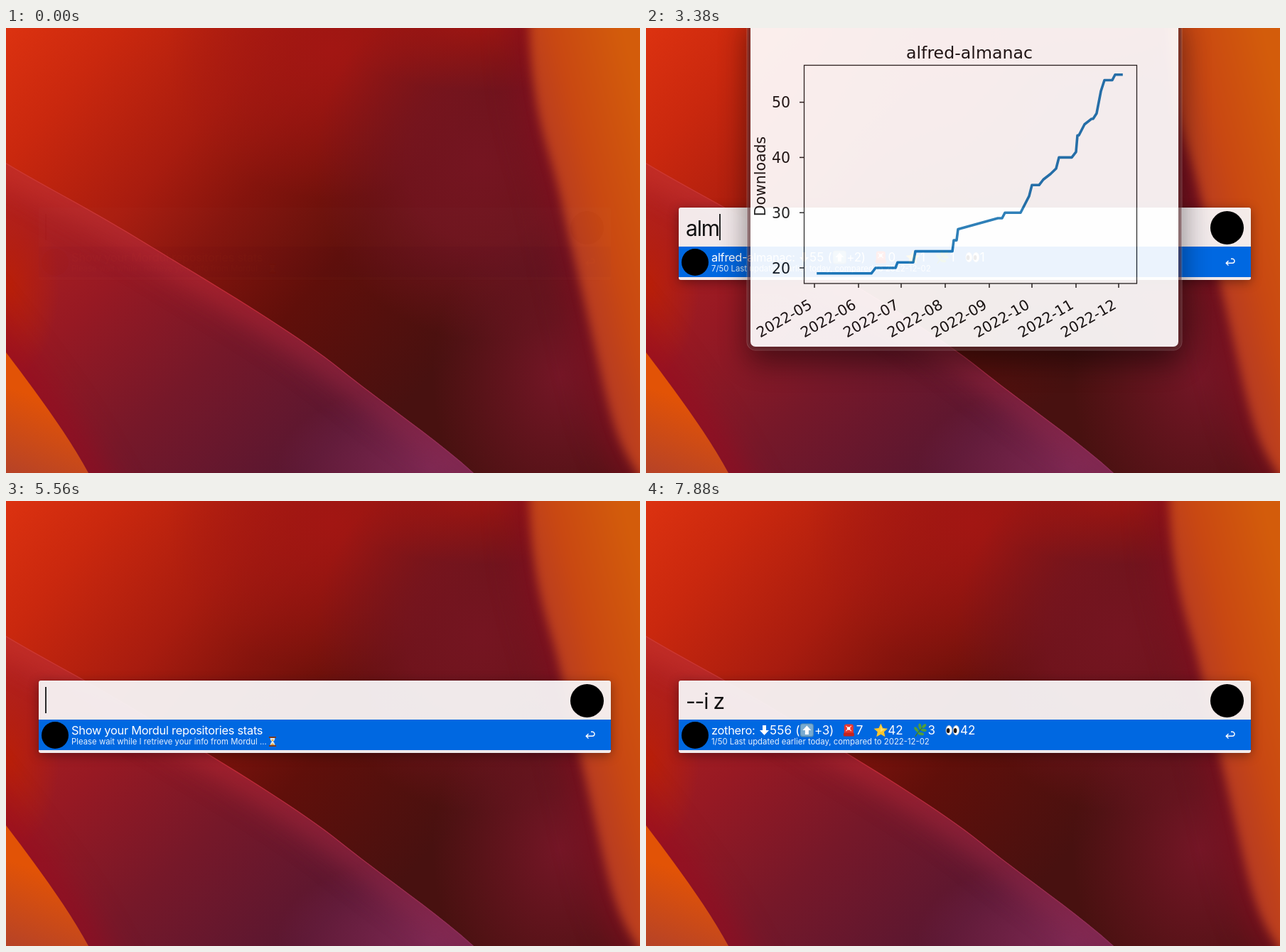
These frames come from a looping animation (892x627 px, 8000 ms). An HTML page:

```html
<!DOCTYPE html>
<html lang="en">
<head>
<meta charset="utf-8">
<title>Repository stats launcher</title>
<style>
html, body { margin: 0; width: 100%; height: 100%; overflow: hidden; background: #7a1414; }
body { position: relative; font-family: Inter, Roboto, sans-serif; color: #111; }
body > svg, .win, .preview { position: absolute; }
.wall { left: 0; top: 0; }
.win { left: 46px; top: 253px; width: 805px; }
.panel, .query, .caret, .logo, .row, .row > * { position: absolute; white-space: pre; }
.panel { left: 0; top: 0; width: 805px; border-radius: 3px; background: rgba(247, 245, 246, .95);
  box-shadow: 0 3px 15px rgba(0, 0, 0, .36), 0 0 1px rgba(0, 0, 0, .4); }
.query { left: 10px; top: 9px; font: 400 30px/40px Inter, Roboto, sans-serif; letter-spacing: -1.2px; }
.caret { top: 9px; width: 2px; height: 37px; background: #2a2a2a; }
.logo { border-radius: 50%; background: #000; }
.big { left: 748px; top: 5px; width: 47px; height: 47px; }
.row { left: 0; width: 805px; height: 43px; }
.row .logo { left: 4px; top: 3px; width: 38px; height: 38px; }
.title, .stats { top: 5px; line-height: 20px; }
.title { left: 46px; font-size: 16.4px; letter-spacing: -.28px; }
.stats { display: flex; align-items: center; height: 20px; font-size: 17px; letter-spacing: .15px; }
.stats svg { flex: none; width: 20.7px; height: 20px; }
.stats svg.drop { width: 14px; height: 16px; }
.num { margin-right: 14px; }
.diff { display: flex; align-items: center; margin: 0 11px 0 -9px; letter-spacing: -.2px; }
.sub { left: 46px; top: 24px; font-size: 11.35px; line-height: 14px; color: #8b8488; }
.sub svg { width: 12px; height: 14px; margin-left: 2px; vertical-align: -3px; }
.key { right: 13px; top: 12px; font-size: 14.5px; line-height: 20px; color: #45106b; }
.first { background: #0068e1; color: #fff; }
.first .sub { color: #e6effc; }
.back { left: 769px; top: 16px; width: 14px; height: 12px; }
.preview { left: 147px; top: -20px; width: 602px; height: 469px; border-radius: 7px; background: #fff;
  box-shadow: 0 0 0 4.5px rgba(70, 10, 15, .5), 0 0 0 5.5px rgba(255, 255, 255, .22), 0 18px 42px 4px rgba(0, 0, 0, .5); }
.preview svg { position: absolute; left: -147px; top: 20px; overflow: visible; }
.preview text { font: 20.5px "DejaVu Sans", sans-serif; fill: #151515; }
.preview .head { font-size: 23.7px; }
</style>
</head>
<body>
<svg class="wall" width="892" height="627" viewBox="0 0 892 627">
  <defs>
    <linearGradient id="base" gradientUnits="userSpaceOnUse" x1="0" y1="0" x2="590" y2="500">
      <stop offset="0" stop-color="#dc3210"/><stop offset=".16" stop-color="#ca280e"/>
      <stop offset=".38" stop-color="#a81c0f"/><stop offset=".53" stop-color="#85140d"/>
      <stop offset=".73" stop-color="#600f0a"/><stop offset="1" stop-color="#481110"/>
    </linearGradient>
    <linearGradient id="sheet" gradientUnits="userSpaceOnUse" x1="0" y1="220" x2="400" y2="640">
      <stop offset="0" stop-color="#b5221e"/><stop offset=".35" stop-color="#971923"/>
      <stop offset=".65" stop-color="#761829"/><stop offset="1" stop-color="#591731"/>
    </linearGradient>
    <linearGradient id="amber" gradientUnits="userSpaceOnUse" x1="755" y1="190" x2="905" y2="150">
      <stop offset="0" stop-color="#b53a24"/><stop offset=".4" stop-color="#c94812"/>
      <stop offset="1" stop-color="#d35c0b"/>
    </linearGradient>
    <linearGradient id="corner" gradientUnits="userSpaceOnUse" x1="45" y1="520" x2="0" y2="645">
      <stop offset="0" stop-color="#e25306"/><stop offset="1" stop-color="#b0402c"/>
    </linearGradient>
    <linearGradient id="rim" gradientUnits="userSpaceOnUse" x1="0" y1="190" x2="658" y2="627">
      <stop offset="0" stop-color="#d03a30"/><stop offset=".5" stop-color="#bd2836"/>
      <stop offset="1" stop-color="#8a2c58"/>
    </linearGradient>
    <radialGradient id="plum"><stop offset="0" stop-color="#751521"/><stop offset=".45" stop-color="#751521" stop-opacity=".8"/><stop offset="1" stop-color="#751521" stop-opacity="0"/></radialGradient>
    <radialGradient id="ruby"><stop offset="0" stop-color="#a21613"/><stop offset="1" stop-color="#a21613" stop-opacity="0"/></radialGradient>
    <radialGradient id="wine"><stop offset="0" stop-color="#741626"/><stop offset="1" stop-color="#741626" stop-opacity="0"/></radialGradient>
    <radialGradient id="violet"><stop offset="0" stop-color="#7c2852"/><stop offset="1" stop-color="#7c2852" stop-opacity="0"/></radialGradient>
    <radialGradient id="ember"><stop offset="0" stop-color="#ba1f08"/><stop offset="1" stop-color="#ba1f08" stop-opacity="0"/></radialGradient>
    <filter id="soft" filterUnits="userSpaceOnUse" x="-80" y="-80" width="1060" height="800" color-interpolation-filters="sRGB"><feGaussianBlur stdDeviation="20"/></filter>
    <filter id="edge" filterUnits="userSpaceOnUse" x="-80" y="-80" width="1060" height="800" color-interpolation-filters="sRGB"><feGaussianBlur stdDeviation="7"/></filter>
    <path id="band" d="M734 -60L736 0C740 130 765 170 780 240S815 390 835 480S865 590 888 627L915 690H960V-60Z"/>
    <path id="fold" d="M-60 156L0 190C60 226 110 250 190 299S400 424 470 480S600 575 658 627L720 682"/>
    <path id="tip" d="M-60 380L0 457C40 510 85 570 116 627L150 690"/>
    <clipPath id="under"><path d="M0 190C60 226 110 250 190 299S400 424 470 480S600 575 658 627H0Z"/></clipPath>
  </defs>
  <rect width="892" height="627" fill="url(#base)"/>
  <ellipse cx="455" cy="30" rx="230" ry="210" fill="url(#ruby)"/>
  <ellipse cx="670" cy="190" rx="235" ry="250" fill="url(#plum)"/>
  <ellipse cx="670" cy="-20" rx="230" ry="110" fill="url(#ruby)"/>
  <ellipse cx="780" cy="490" rx="180" ry="240" fill="url(#wine)"/>
  <use href="#band" fill="none" stroke="#850e20" stroke-width="50" opacity=".6" filter="url(#soft)"/>
  <use href="#band" fill="url(#amber)" filter="url(#edge)"/>
  <g clip-path="url(#under)">
    <rect y="150" width="700" height="480" fill="url(#sheet)"/>
    <ellipse cx="0" cy="365" rx="75" ry="130" fill="url(#ember)"/>
    <ellipse cx="600" cy="620" rx="220" ry="120" fill="url(#violet)"/>
    <use href="#tip" fill="none" stroke="#980a20" stroke-width="50" opacity=".6" filter="url(#soft)"/>
    <use href="#fold" fill="none" stroke="url(#rim)" stroke-width="40" opacity=".65" filter="url(#soft)"/>
    <use href="#fold" fill="none" stroke="url(#rim)" stroke-width="2.4"/>
  </g>
  <path d="M0 457C40 510 85 570 116 627H0Z" fill="url(#corner)"/>
</svg>

<svg width="0" height="0">
  <symbol id="drop" viewBox="0 0 14 16"><path d="M4 1h5v7h4L6.5 15 0 8h4z" fill="currentColor"/></symbol>
  <symbol id="up" viewBox="0 0 20 20"><rect x=".5" y=".5" width="19" height="19" rx="3.5" fill="#5b8fb5"/><rect x="1.5" y="1.5" width="17" height="16.5" rx="3" fill="#79abd0"/><path d="M10 3.5l6 6.5h-3.5v6h-5v-6H4z" fill="#fff"/></symbol>
  <symbol id="down" viewBox="0 0 20 20"><use href="#up" width="20" height="20" transform="rotate(180 10 10)"/></symbol>
  <symbol id="siren" viewBox="0 0 20 20"><rect x="3.5" y="1.5" width="13" height="15" rx="3" fill="#e8372f"/><path d="M6 4l7.5 7M13.500 4L6 11" stroke="#ffc4ba" stroke-width="1.300"/><circle cx="9.800" cy="7.500" r="2.300" fill="#fff"/><rect x="2.500" y="13.500" width="15" height="5" rx="1.500" fill="#c3241f"/></symbol>
  <symbol id="star" viewBox="0 0 20 20"><path d="M10 .6l2.900 6.300 6.900.8-5.200 4.600 1.500 6.900-6.100-3.500-6.100 3.500 1.500-6.900L.2 7.700l6.900-.8z" fill="#fbc62d"/><path d="M10 3l1.800 5 4.500.5-7 4z" fill="#ffe06a"/></symbol>
  <symbol id="herb" viewBox="0 0 20 20"><path d="M2.500 19Q7 11 15 4" fill="none" stroke="#3d7a2c" stroke-width="1.400"/><g fill="#4f9d3c"><ellipse cx="15" cy="4" rx="3.600" ry="2" transform="rotate(-45 15 4)"/><ellipse cx="9" cy="4.500" rx="2" ry="4" transform="rotate(-8 9 4.500)"/><ellipse cx="4" cy="9" rx="2" ry="4.300" transform="rotate(-38 4 9)"/><ellipse cx="14.500" cy="10" rx="4" ry="1.900" transform="rotate(8 14.500 10)"/><ellipse cx="10.500" cy="15" rx="4.400" ry="2" transform="rotate(14 10.500 15)"/></g></symbol>
  <symbol id="eyes" viewBox="0 0 20 20"><g fill="#fff" stroke="#b9b4b4" stroke-width=".7"><ellipse cx="5" cy="10" rx="4.300" ry="6.800"/><ellipse cx="15" cy="10" rx="4.300" ry="6.800"/></g><g fill="#1c1512"><ellipse cx="3.800" cy="10.500" rx="2.300" ry="3.600"/><ellipse cx="13.800" cy="10.500" rx="2.300" ry="3.600"/></g></symbol>
  <symbol id="glass" viewBox="0 0 12 14"><path d="M2.500 1.500h7q0 3.500-2.500 5.500 2.500 2 2.500 5.500h-7Q2.500 9 5 7 2.500 5 2.500 1.500z" fill="#dfe9ee"/><path d="M4 4h4L6 7zM3 12.500q1-3 3-3t3 3z" fill="#e2a94a"/><path d="M1 1h10M1 13h10" stroke="#7c3b22" stroke-width="2"/></symbol>
  <symbol id="back" viewBox="0 0 14 12"><path d="M4.500 4L1.200 7.300l3.300 3.300M1.300 7.300H10a3 3 0 0 0 0-6H8" fill="none" stroke="currentColor" stroke-width="1.400"/></symbol>
</svg>

<div class="win"><div class="logo big"></div></div>

<div class="preview">
  <svg width="892" height="627">
    <text class="head" x="455" y="43" text-anchor="middle">alfred-almanac</text>
    <text transform="translate(168 209) rotate(-90)" text-anchor="middle">Downloads</text>
    <rect x="222.500" y="52.500" width="468" height="307.500" fill="none" stroke="#222" stroke-width="1.300"/>
    <g id="ticks" stroke-width="1.500"></g>
    <path id="curve" fill="none" stroke="#1f77b4" stroke-width="3.600" stroke-linejoin="round" stroke-linecap="square"/>
    <g id="scan"><circle cx="730.500" cy="430.500" r="12.500" fill="#2b2523"/>
      <path d="M724.500 428v-3.500h3.500M733 424.500h3.500v3.500M736.500 433v3.500H733M728 436.500h-3.500V433M727 428h7M727 430.500h7M727 433h4.500" fill="none" stroke="#f3eeee" stroke-width="1.200"/></g>
  </svg>
</div>

<script>
const LOOP = 8000;
const $ = s => document.querySelector(s);
const win = $('.win');
const sheet = document.head.appendChild(document.createElement('style'));
let count = 0;

// Opacity track from [ms, value] pairs
function play(el, track, timing = 'linear') {
  const name = 'k' + count++;
  const frames = track.map(([ms, v]) => `${ms / LOOP * 100}%{opacity:${v}}`).join('');
  sheet.append(`@keyframes ${name}{${frames}}\n`);
  el.style.animation = `${name} ${LOOP}ms ${timing} infinite`;
}

// Visible only inside the given spans
function show(el, ...spans) {
  const track = spans.flatMap(([a, b]) => [[a, 1], [b, b === LOOP ? 1 : 0]]);
  if (spans[0][0] > 0) track.unshift([0, 0]);
  play(el, track, 'step-end');
}

function add(parent, cls, html = '') {
  const el = document.createElement('div');
  el.className = cls;
  el.innerHTML = html;
  parent.append(el);
  return el;
}

const icon = (id, cls = id) => `<svg class="${cls}"><use href="#${id}"/></svg>`;
const KINDS = ['drop', 'siren', 'star', 'herb', 'eyes'];

function statsHtml(text) {
  return text.split(' ').map((part, i) => {
    const [, n, diff] = part.match(/^(\d+)([+-]\d+)?$/);
    const change = diff
      ? `<span class="diff">(${icon(diff[0] === '+' ? 'up' : 'down')}${diff})</span>` : '';
    return icon(KINDS[i]) + `<span class="num">${n}</span>` + change;
  }).join('');
}

// name: [x of the first arrow, downloads issues stars forks watchers]
const REPOS = {
  'alfred-convert': [210, '649+1 0 35 0 35'],
  'zothero': [160, '556+3 7 42 3 42'],
  'alfred-powerthesaurus': [274, '322+1 0 25 0 25'],
  'alfred-fakeum': [209, '157+1 0 15+1 0 15+1'],
  'alfred-DateCalculator': [265, '98 0 7 0 7'],
  'alfred-crypto-tracker': [262, '92 0 2 0 2'],
  'alfred-almanac': [216, '55+2 0 1 1 1'],
  'alfred-character_counter': [291, '55 0 2 0 2'],
  'paperpAlfred': [200, '36 1 7 0 7'],
  'alfred-searchio': [217, '23 1-1 3 2 3'],
  'beeAlfred': [175, '18 1 7 3 7']
};
const names = Object.keys(REPOS);
const byDownloads = names.slice(0, 8);
const byIssues = ['zothero', ...names.slice(8), 'alfred-convert', ...names.slice(2, 5)];

function row(panel, i, title, sub, stats = '') {
  const el = add(panel, i ? 'row' : 'row first');
  el.style.top = 55 + i * 43.45 + 'px';
  add(el, 'logo');
  add(el, 'title', title);
  add(el, 'sub', sub);
  if (stats) add(el, 'stats', statsHtml(stats[1])).style.left = stats[0] - 46 + 'px';
  if (i) add(el, 'key', '⌘' + (i + 1));
  else el.insertAdjacentHTML('beforeend', icon('back'));
}

function panel(rows) {
  const el = add(win, 'panel');
  el.style.height = 58.5 + rows * 43.45 + 'px';
  win.prepend(el);
  return el;
}

function list(items, rank = 1) {
  const el = panel(items.length);
  items.forEach((name, i) => row(el, i, name + ':',
    `${rank + i}/50 Last updated earlier today, compared to 2022-12-02`, REPOS[name]));
  return el;
}

const wait = panel(1);
row(wait, 0, 'Show your Mordul repositories stats',
  'Please wait while I retrieve your info from Mordul ...' + icon('glass'));
show(wait, [0, 540], [5250, 5800]);
show(list(byDownloads), [540, 2050], [5800, 6560]);
show(list(['alfred-almanac'], 7), [2050, 5250]);
show(list(byIssues), [6560, 7500]);
show(list(['zothero']), [7500, LOOP]);

// Typed text, caret x, visible span
const caret = add(win, 'blink');
[
  ['', 56, 0, 1440], ['a', 71, 1440, 1640], ['al', 78, 1640, 1990], ['alm', 104, 1990, 5250],
  ['', 56, 5250, 6060], ['-', 69, 6060, 6250], ['--', 82, 6250, 6490], ['--i', 90, 6490, 7370],
  ['--i ', 97, 7370, 7440], ['--i z', 112, 7440, LOOP]
].forEach(([text, x, from, to]) => {
  show(add(win, 'query', text), [from, to]);
  const bar = add(caret, 'caret');
  bar.style.left = x - 47 + 'px';
  show(bar, [from, to]);
});
show(caret, [0, 1060], [1440, 2370], [2870, 6910], [7370, 7840]);

play(win, [[0, .015], [130, .015], [320, 1], [5000, 1], [5190, 0], [5370, 0], [5540, 1], [LOOP, 1]]);
play($('.preview'), [[0, 0], [3150, 0], [3400, 1], [4485, 1], [4790, 0], [LOOP, 0]]);
play($('#scan'), [[0, 0], [3790, 0], [3880, 1], [LOOP, 1]]);

// Chart
const yOf = v => 338 - (v - 20) * 7.78;
let marks = '';
for (const v of [20, 30, 40, 50])
  marks += `<path d="M216 ${yOf(v)}h6" stroke="#222"/><text x="203" y="${yOf(v) + 7.5}" text-anchor="end">${v}</text>`;
for (let m = 5; m <= 12; m++) {
  const days = (Date.UTC(2022, m - 1) - Date.UTC(2022, 4)) / 864e5;
  const x = 237 + days * 2;
  marks += `<path d="M${x} 360v6" stroke="#222"/><text transform="translate(${x - 2} 394) rotate(-30)" text-anchor="end">2022-${String(m).padStart(2, '0')}</text>`;
}
$('#ticks').innerHTML = marks;
const points = [[242, 19], [317, 19], [323, 20], [351, 20], [354, 21], [376, 21], [379, 23], [431, 23],
  [433, 25], [437, 25], [439, 27], [495, 29], [501, 29], [505, 30], [527, 30], [539, 33], [543, 35],
  [553, 35], [559, 36], [569, 37], [577, 38], [581, 40], [599, 40], [605, 41], [607, 44], [609, 44],
  [617, 46], [627, 47], [629, 47], [634, 48], [640, 52], [645, 54], [656, 54], [660, 55], [669, 55]];
$('#curve').setAttribute('d', 'M' + points.map(([x, v]) => `${x} ${yOf(v)}`).join('L'));
</script>
</body>
</html>
```
